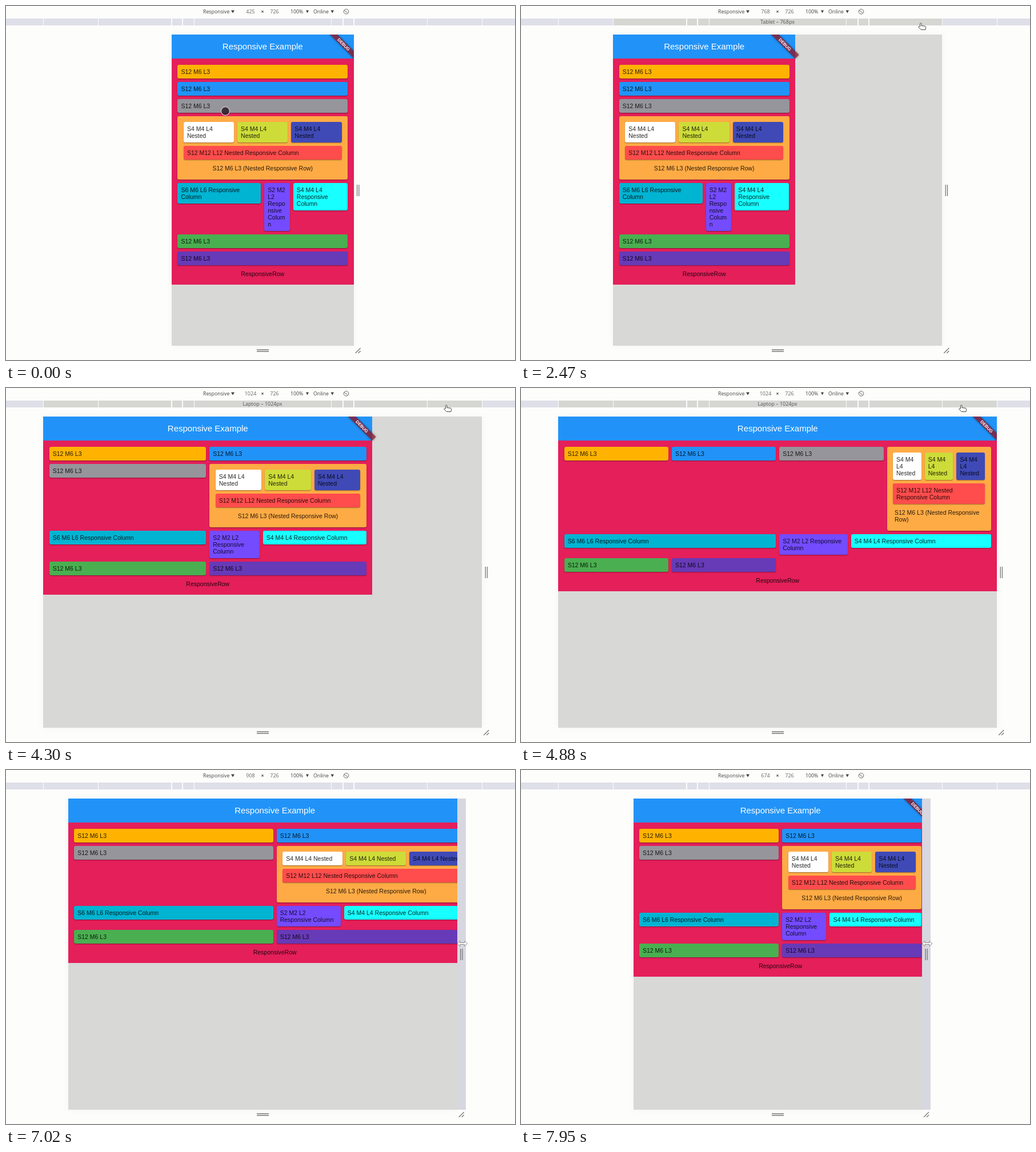
Recreate the animation shown at these times as an HTML page. Size 891 by 620 pixels, loop 8 s.

```html
<!DOCTYPE html>
<html lang="en">
<head>
<meta charset="utf-8">
<title>Responsive Example</title>
<style>
html, body { margin: 0; width: 100%; height: 100%; overflow: hidden; }
body { position: relative; background: #fdfdfc; }
#bars, #hover, #strip, #view, svg { position: absolute; }
#bars { left: 0; top: 22px; width: 891px; height: 12px; background: #dfdfe9; overflow: hidden; }
#hover { top: 0; height: 12px; background: #d6d6d2; }
#bars i { position: absolute; top: 0; width: 1.5px; height: 12px; background: #fbfbfd; }
#label { position: absolute; left: 349px; width: 200px; text-align: center; color: #555; font: 9px/12px "Open Sans", sans-serif; }
#view { top: 50.2px; height: 544.8px; background: #d8d8d7; overflow: hidden; box-shadow: 0 0 14px rgba(0, 0, 0, .04); }
#strip { top: 50px; width: 15px; height: 545px; background: #d7d7e0; }
#app { position: relative; font: 10.5px/12px "Liberation Sans", Arial, sans-serif; color: rgba(0, 0, 0, .84); }
header { height: 42px; background: #2193f8; color: #fff; text-align: center; font-size: 15px; line-height: 41px; }
#debug { position: absolute; right: -12px; top: 13px; width: 60px; height: 9px; transform: rotate(45deg);
  background: rgba(140, 22, 40, .8); box-shadow: 0 0 4px rgba(0, 0, 0, .5); color: #fff;
  font-size: 7.6px; font-weight: bold; line-height: 9px; text-align: center; }
.row { padding: 7.5px; }
#app > .row { background: #e41f5a; }
.cells { display: flex; flex-wrap: wrap; align-items: flex-start; }
.cell { box-sizing: border-box; padding: 3px; min-width: 0; }
.card { border-radius: 3px; overflow-wrap: anywhere; box-shadow: 0 1px 1.5px rgba(0, 0, 0, .4); }
.text { padding: 6px; }
.caption { padding: 6px; width: fit-content; margin: 0 auto; }
svg { left: 0; top: 0; font: 8.8px "Open Sans", sans-serif; fill: #444; }
.grip { stroke: #777; stroke-width: 1.3; fill: none; }
.cursor { fill: #fff; stroke: #444; stroke-width: 1; stroke-linejoin: round; }
</style>
</head>
<body>
<div id="bars"><div id="hover"></div><div id="label"></div></div>
<div id="view"><div id="app"><header>Responsive Example</header><div id="debug">DEBUG</div></div></div>
<div id="strip"></div>
<svg width="891" height="620">
  <text x="345" y="13">Responsive</text>
  <text id="width" x="428" y="13" text-anchor="middle" font-size="9" fill="#666"></text>
  <text x="449" y="13" text-anchor="middle" font-weight="bold">×</text>
  <text x="470" y="13" text-anchor="middle" font-size="9" fill="#666">726</text>
  <text x="498" y="13">100%</text>
  <text x="538" y="13">Online</text>
  <path d="M394 7.5h6l-3 5zM525 7.5h5l-2.5 5zM568.5 7.5h5.5l-2.75 5z"/>
  <g fill="none" stroke="#666"><circle cx="595.5" cy="9.8" r="4.3"/><path d="M592 7.5l6.5 5"/></g>
  <path class="grip" d="M439 602h21M439 605h21"/>
  <g id="grips" class="grip"><path d="M6 313v20M9.2 313v20M3 608l9-9M8 608l4-4"/></g>
  <g id="touch" class="cursor"><circle r="7.5" fill="#2c1c2c" fill-opacity=".85" stroke="#c9b9c0" stroke-width="1.4"/></g>
  <g id="arrow" class="cursor"><path d="M0 0v15l3.5-3.2 2.5 5.7 2.6-1.1-2.5-5.5h5z"/></g>
  <g id="hand" class="cursor"><path d="M-1.4 6V1.2a1.2 1.2 0 0 1 2.4 0V4.5l6 .8c1.4.3 1.8 1 1.6 2.2l-.7 4H.2L-4 7.3c-.6-.8.3-1.8 1.2-1.2z"/></g>
  <g id="resize" class="cursor"><path stroke="#888" d="M-9 0l5-4.5v3h8v-3l5 4.5-5 4.5v-3h-8v3z"/></g>
</svg>
<script>
const LOOP = 8000, SCALE = .75, CENTER = 449.25, DRAG_START = 6330;
const $ = id => document.getElementById(id);

// Column spans are for small, medium and large layouts.
const FULL = [12, 6, 3], HALF = [6, 6, 6], THIRD = [4, 4, 4], SIXTH = [2, 2, 2], WHOLE = [12, 12, 12];
const plain = color => [FULL, color, 'S12 M6 L3'];
const small = color => [THIRD, color, 'S4 M4 L4 Nested'];
const NESTED = {
  caption: 'S12 M6 L3 (Nested Responsive Row)',
  cells: [
    ...['#ffffff', '#cddc39', '#3f4ab6'].map(small),
    [WHOLE, '#ff4c4c', 'S12 M12 L12 Nested Responsive Column']
  ]
};
const PAGE = {
  caption: 'ResponsiveRow',
  cells: [
    ...['#ffb300', '#2193f8', '#95959b'].map(plain),
    [FULL, '#ffab45', NESTED],
    [HALF, '#00b4d2', 'S6 M6 L6 Responsive Column'],
    [SIXTH, '#744bff', 'S2 M2 L2 Responsive Column'],
    [THIRD, '#18ffff', 'S4 M4 L4 Responsive Column'],
    ...['#4aaf50', '#673ab7'].map(plain)
  ]
};

// Power 0 jumps at once, as a click does; other powers shape a drag.
const RESIZES = [
  { start: 2470, end: 2560, steps: 2, to: 768, power: 0 },
  { start: 4300, end: 4440, steps: 4, to: 1024, power: 0 },
  { start: DRAG_START, end: 7020, steps: 8, to: 908, power: 5 },
  { start: 7160, end: 7280, steps: 2, to: 850, power: 1 },
  { start: 7420, end: 7950, steps: 7, to: 674, power: .5 }
];
const PATH = [
  [0, 384, 184], [40, 395, 184], [280, 395, 184], [1080, 418, 40], [1230, 543, 39], [1700, 700, 30],
  [2910, 700, 30], [3560, 771, 30], [4880, 771, 30], [5250, 869, 150], [5650, 846, 308], [LOOP, 846, 308]
];
const BARS = [320, 375, 425, 768, 1024];
const DEVICES = { 768: 'Tablet', 1024: 'Laptop' };

function el(parent, cls, text = '') {
  const node = document.createElement('div');
  node.className = cls;
  node.textContent = text;
  return parent.appendChild(node);
}

const sized = [];
function buildRow(parent, { cells, caption }) {
  const row = el(parent, 'row'), list = el(row, 'cells');
  for (const [spans, color, content] of cells) {
    const cell = el(list, 'cell'), card = el(cell, 'card');
    card.style.background = color;
    if (typeof content === 'string') el(card, 'text', content);
    else buildRow(card, content);
    sized.push([cell, spans]);
  }
  el(row, 'caption', caption);
}

// The page layout lags one step behind the viewport.
function buildSteps() {
  const list = [{ time: 0, width: 425, layout: 425 }];
  for (const { start, end, steps, to, power } of RESIZES) {
    const from = list.at(-1).width;
    for (let i = 0; i < steps; i++)
      list.push({
        time: start + (end - start) * i / (steps - 1),
        width: Math.round(from + (to - from) * ((i + 1) / steps) ** power),
        layout: list.at(-1).width
      });
  }
  return list;
}

function setLayout(width) {
  const size = width < 600 ? 0 : width < 992 ? 1 : 2;
  $('app').style.width = width * SCALE + 'px';
  for (const [cell, spans] of sized)
    cell.style.width = Math.floor(spans[size] / 12 * 1e4) / 100 + '%';
}

function pointAt(t) {
  const i = PATH.findIndex(p => p[0] > t);
  const [t0, x0, y0] = PATH[i - 1], [t1, x1, y1] = PATH[i];
  const k = ((t - t0) / (t1 - t0)) ** 2;
  return [x0 + (x1 - x0) * k, y0 + (y1 - y0) * k];
}

function showHover(bar) {
  $('hover').style.display = bar ? '' : 'none';
  $('label').textContent = bar ? `${DEVICES[bar]} – ${bar}px` : '';
  if (!bar) return;
  $('hover').style.left = CENTER - bar * SCALE / 2 + 'px';
  $('hover').style.width = bar * SCALE + 'px';
}

let shown;
function showStep(step, half) {
  if (step === shown) return;
  shown = step;
  setLayout(step.layout);
  $('view').style.left = CENTER - half + 'px';
  $('view').style.width = half * 2 + 'px';
  $('strip').style.left = CENTER + half + 'px';
  $('width').textContent = step.width;
  $('grips').setAttribute('transform', `translate(${CENTER + half})`);
}

function draw() {
  const t = performance.now() % LOOP;
  const step = steps.findLast(s => s.time <= t);
  const half = step.width * SCALE / 2, right = CENTER + half;
  showStep(step, half);

  const [x, y] = t < DRAG_START ? pointAt(t) : [right + 9, 304];
  const inBar = y > 22 && y < 35;
  const bar = inBar && BARS.find(b => Math.abs(x - CENTER) < b * SCALE / 2);
  showHover(DEVICES[bar] ? bar : 0);

  const onEdge = y > 50 && x >= right && x <= right + 15;
  const kind = onEdge ? 'resize' : bar ? 'hand' : y > 50 && x < right ? 'touch' : 'arrow';
  $('strip').style.display = onEdge ? '' : 'none';
  for (const id of ['touch', 'arrow', 'hand', 'resize'])
    $(id).style.display = id === kind ? '' : 'none';
  $(kind).setAttribute('transform', `translate(${x} ${y})`);
  requestAnimationFrame(draw);
}

buildRow($('app'), PAGE);
const steps = buildSteps();
for (const bar of BARS)
  for (const side of [-1, 1]) {
    const line = $('bars').appendChild(document.createElement('i'));
    line.style.left = CENTER + side * bar * SCALE / 2 - .5 + 'px';
  }
draw();
</script>
</body>
</html>
```
